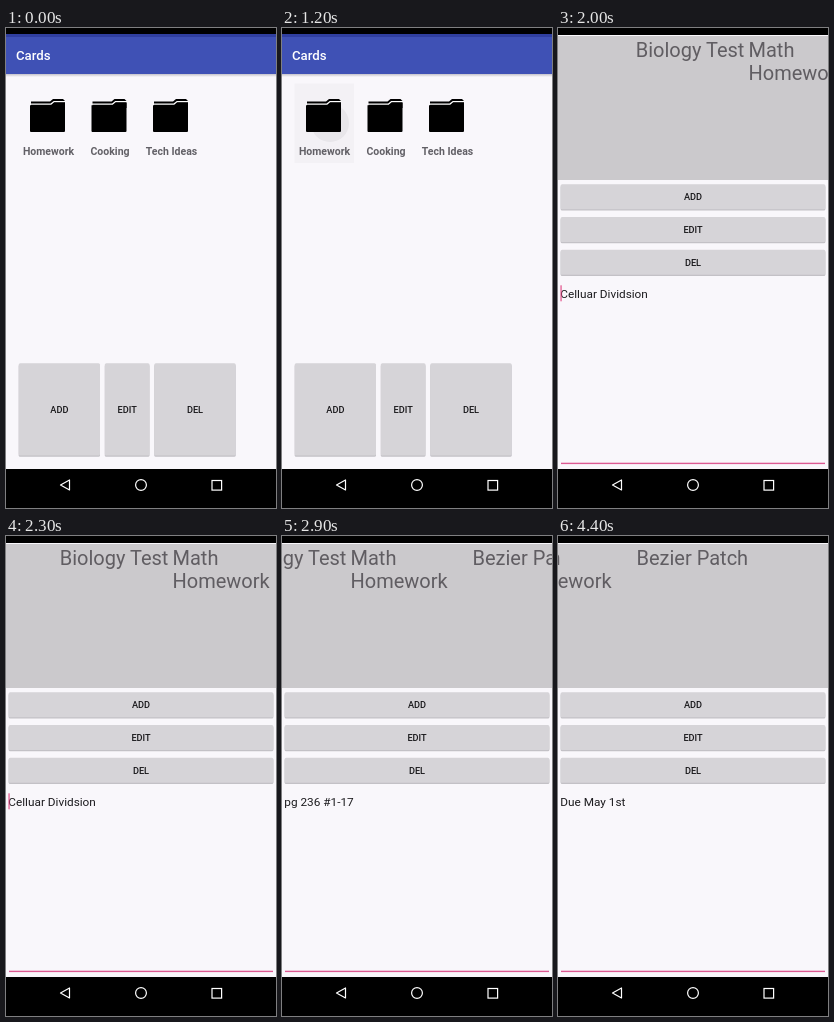
Recreate the animation shown at these times as an HTML page. Size 270x480 px, loop 5000 ms.

```html
<!DOCTYPE html>
<html lang="en">
<head>
<meta charset="utf-8">
<title>Cards</title>
<style>
html, body { margin: 0; height: 100%; overflow: hidden; background: #000; }
svg { display: block; width: 270px; height: 480px; font-family: Roboto, sans-serif; }
.mid { text-anchor: middle; }
.label { font-size: 10.5px; font-weight: 700; fill: #626066; }
.caption { font-size: 9.2px; font-weight: 500; fill: #18171a; }
.big { font-size: 20px; fill: #605d62; }
.note { font-size: 11.8px; fill: #1c1b1e; }
.face { fill: #d6d4d8; }
.shade { fill: #c3c1c6; }
</style>
</head>
<body>
<svg viewBox="0 0 270 480">
  <defs>
    <g id="folder">
      <path d="M25 76V73.5H44L47 71H57L59 73V80H25z"/>
      <path d="M24.5 76.1H45L48 73.6H59.5" fill="none" stroke="#fff" stroke-width="1.3"/>
      <path d="M24 77.3H45.5L48.5 74.8H59V103q0 1-1 1H25q-1 0-1-1z"/>
    </g>
    <linearGradient id="drop" x2="0" y2="1">
      <stop stop-color="#c4c2ca"/><stop offset="1" stop-color="#f9f7fb"/>
    </linearGradient>
  </defs>
  <rect y="7" width="270" height="434" fill="#f9f7fb"/>

  <g id="home">
    <rect y="6" width="270" height="3" fill="#303f9f"/>
    <rect y="9" width="270" height="37" fill="#3f51b5"/>
    <rect y="46" width="270" height="3" fill="url(#drop)"/>
    <text x="10" y="32.3" font-size="13.2" font-weight="500" fill="#fff">Cards</text>
    <g id="press">
      <rect x="12.5" y="55.5" width="59.5" height="79.5" fill="#f3f1f5"/>
      <circle id="ripple" cx="48" cy="95" fill="#e8e6ea"/>
    </g>
  </g>

  <g id="deck">
    <rect y="8" width="270" height="144" fill="#cbc9cc"/>
    <g id="strip">
      <text class="big" x="-114.3" y="28.6">Biology Test</text>
      <text class="big" x="-1.5" y="28.6">Math</text>
      <text class="big" x="-1.5" y="52">Homework</text>
      <text class="big" id="third" x="120.5" y="28.6">Bezier Patch</text>
    </g>
    <text class="note" id="note" x="2.3" y="270"></text>
    <rect id="caret" x="2.5" y="257.3" width="1.1" height="16" fill="#e0417f"/>
    <rect x="3" y="434.7" width="264" height="1.4" fill="#dc5a92"/>
  </g>

  <rect y="441" width="270" height="39"/>
  <g fill="none" stroke="#fff" stroke-width="1.2">
    <path d="M63.5 452V462L54.5 457z" stroke-linejoin="round"/>
    <circle cx="135" cy="457" r="5.4"/>
    <rect x="206" y="452.5" width="9.6" height="9.6"/>
  </g>
</svg>
<script>
const $ = id => document.getElementById(id);
const show = (id, on) => $(id).style.display = on ? '' : 'none';

function add(parent, tag, attrs, text = '') {
  const el = document.createElementNS('http://www.w3.org/2000/svg', tag);
  for (const k in attrs) el.setAttribute(k, attrs[k]);
  el.textContent = text;
  $(parent).append(el);
}

function button(parent, x, y, width, height, text) {
  add(parent, 'rect', { x, y: y + 1.2, width, height, rx: 1.5, class: 'shade' });
  add(parent, 'rect', { x, y, width, height, rx: 1.5, class: 'face' });
  add(parent, 'text', { x: x + width / 2, y: y + height / 2 + 3.3, class: 'mid caption' }, text);
}

['Homework', 'Cooking', 'Tech Ideas'].forEach((name, i) => {
  add('home', 'use', { href: '#folder', x: 61.5 * i });
  add('home', 'text', { x: 42.5 + 61.5 * i, y: 126.7, class: 'mid label' }, name);
});
[[12.7, 81.3, 'ADD'], [98.8, 44.7, 'EDIT'], [148.3, 81.4, 'DEL']]
  .forEach(([x, w, text]) => button('home', x, 335.3, w, 92.2, text));
['ADD', 'EDIT', 'DEL'].forEach((text, i) => button('deck', 2.6, 156.2 + 32.8 * i, 264.8, 25, text));

// Each track is [start ms, value]; the last reached value holds.
const at = (track, t) => track.reduce((v, [start, next]) => t >= start ? next : v, track[0][1]);

const radius = [[1000, 8], [1100, 13], [1200, 19]];
const scroll = [
  [0, 194], [2000, 192], [2300, 168], [2400, 108], [2500, 76], [2600, 73],
  [2800, 71.5], [2900, 70], [3400, 46], [3500, -22], [3600, -42]
];
const notes = [[0, 'Celluar Dividsion'], [2400, 'pg 236 #1-17'], [3500, 'Due May 1st']];
const caret = [[0, true], [2800, false], [3400, true], [3600, false], [4000, true], [4400, false]];

function draw() {
  const t = performance.now() % 5000;
  show('home', t < 1400);
  show('deck', t >= 1400);
  show('press', t >= 1000);
  $('ripple').setAttribute('r', at(radius, t));
  $('strip').setAttribute('transform', `translate(${at(scroll, t)})`);
  show('third', t >= 2600);
  $('note').textContent = at(notes, t);
  show('caret', at(caret, t));
  requestAnimationFrame(draw);
}
draw();
</script>
</body>
</html>
```
